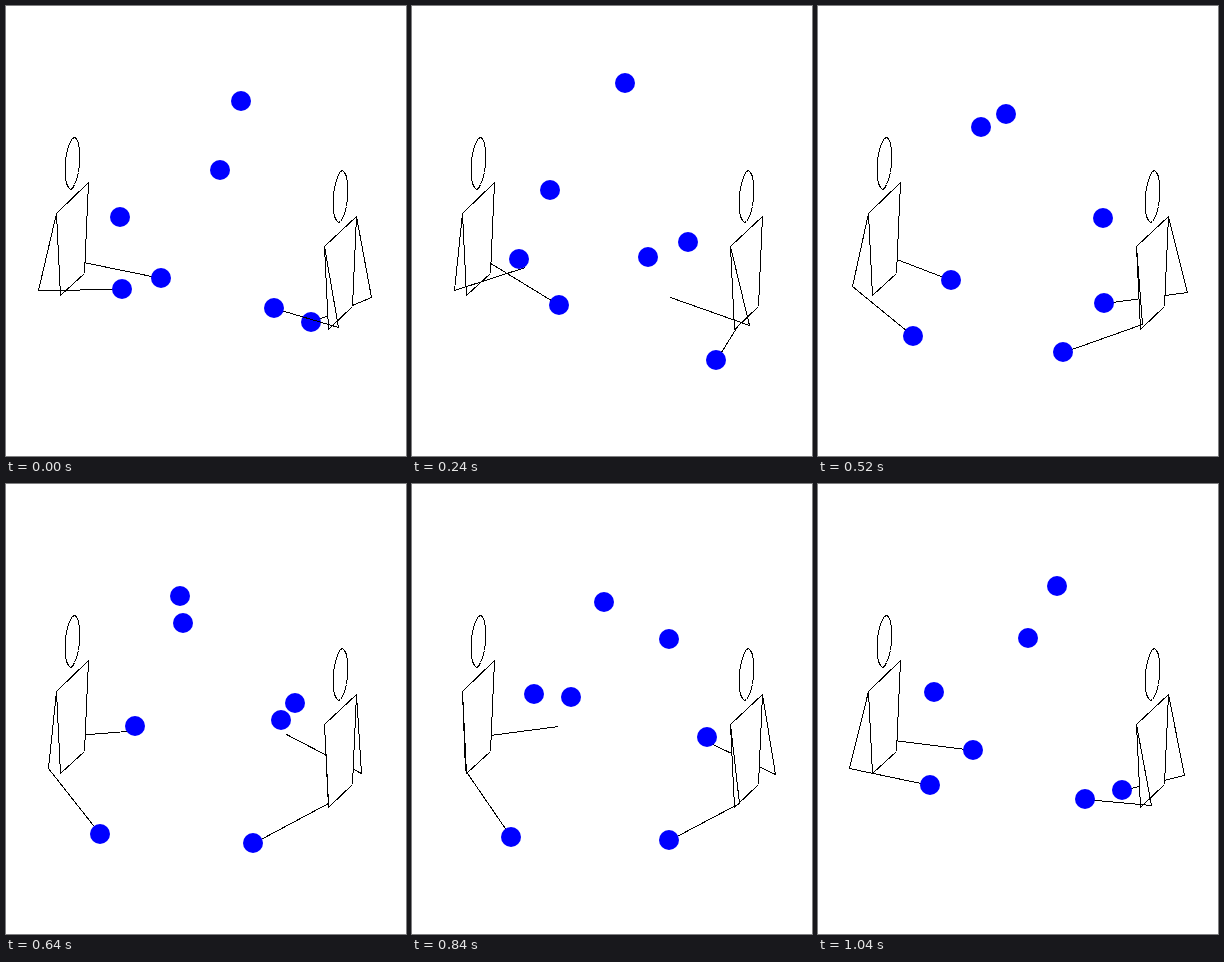
An HTML page for the animation above (1080 ms loop, 400 by 450 pixels).

```html
<!DOCTYPE html>
<html lang="en">
<head>
<meta charset="utf-8">
<title>Passing pattern</title>
<style>
  html, body { margin: 0; width: 100%; height: 100%; overflow: hidden; background: #fff; }
  svg { display: block; }
  circle { fill: #00f; stroke: none; }
  polyline, polygon { shape-rendering: crispEdges; transform: translate(.5px, .5px); }
</style>
</head>
<body>
<svg width="400" height="450" viewBox="0 0 400 450">
  <g id="scene" stroke="#000"></g>
</svg>
<script>
// Space is in cm: [x toward the back, y downward, z from left to right juggler].
// Time is in steps of 40 ms; each hand repeats every 27 steps.
const STEP = 40, PERIOD = 27, EMPTY = 9.45, DWELL = PERIOD - EMPTY;
const GAP = 138.8, G = 0.2971, ARM = 41;
const scene = document.getElementById('scene');

const mix = (f, ...vs) => vs[0].map((_, i) => f(...vs.map(v => v[i])));
const mod = t => (t % PERIOD + PERIOD) % PERIOD;

const project = ([x, y, z]) => [
  Math.round(66 + 0.703 * x + 1.931 * z),
  Math.round(191.4 - 0.66 * x + 0.241 * z + 1.931 * y)
];

function makeHand(side, who, start, catchX) {
  const z = who ? GAP - 30 : 30;
  return {
    start,
    shoulder: [23 * side, 0, GAP * who],
    from: [11.4 * side, 39.75, z],
    into: [catchX * side, 39.75, z]
  };
}

const leftNear = makeHand(-1, 0, 0, 30.8);
const rightNear = makeHand(-1, 1, 0, 39.3);
const leftFar = makeHand(1, 0, 13.5, 39.3);
const rightFar = makeHand(1, 1, 13.5, 30.8);
const near = [leftNear, rightNear], far = [leftFar, rightFar];
const hands = [...near, ...far];

function aim(hand, target, flight) {
  hand.flight = flight;
  hand.vThrow = mix((a, b) => (b - a) / flight, hand.from, target.into);
  hand.vThrow[1] -= G * flight;
  // Catch velocity that keeps the hand's acceleration continuous
  hand.vCatch = mix((p, c, v) => {
    const d = 6 * (p - c);
    return (d / DWELL ** 2 - 2 * v / DWELL - d / EMPTY ** 2 - 2 * v / EMPTY) /
      (4 / EMPTY + 4 / DWELL);
  }, hand.from, hand.into, hand.vThrow);
}
aim(leftNear, rightNear, 36.45);
aim(rightFar, leftFar, 36.45);
aim(rightNear, rightFar, 22.95);
aim(leftFar, leftNear, 22.95);

function hermite(p, v, q, w, h, t) {
  const s = t / h, r = 1 - s;
  return mix((a, b, c, d) =>
    r * r * (1 + 2 * s) * a + s * r * r * h * b + s * s * (3 - 2 * s) * c - s * s * r * h * d,
    p, v, q, w);
}

function handAt(hand, t) {
  const u = mod(t - hand.start);
  return u < EMPTY
    ? hermite(hand.from, hand.vThrow, hand.into, hand.vCatch, EMPTY, u)
    : hermite(hand.into, hand.vCatch, hand.from, hand.vThrow, DWELL, u - EMPTY);
}

function ballsAt(t) {
  const balls = [];
  for (const hand of hands) {
    const u = mod(t - hand.start);
    if (u >= EMPTY) balls.push(handAt(hand, t));
    for (let e = u; e < hand.flight; e += PERIOD) {
      const p = mix((a, v) => a + v * e, hand.from, hand.vThrow);
      p[1] += G * e * e;
      balls.push(p);
    }
  }
  return balls;
}

// Two equal links bending downward in the vertical plane of shoulder and hand
function elbow(shoulder, hand) {
  const d = mix((a, b) => b - a, shoulder, hand);
  const dist = Math.hypot(...d);
  if (dist >= 2 * ARM) return null;
  const drop = Math.sqrt(ARM * ARM - dist * dist / 4);
  const flat = Math.hypot(d[0], d[2]);
  const k = 0.5 - drop * d[1] / (dist * flat);
  return [
    shoulder[0] + d[0] * k,
    shoulder[1] + d[1] / 2 + drop * flat / dist,
    shoulder[2] + d[2] * k
  ];
}

const shape = (tag, points, fill) =>
  `<${tag} points="${points.map(project).join(' ')}" fill="${fill}"/>`;

function arm(hand, t) {
  const end = handAt(hand, t);
  const joints = [hand.shoulder, elbow(hand.shoulder, end), end].filter(Boolean);
  return shape('polyline', joints, 'none');
}

function ball(p) {
  const [x, y] = project(p);
  return `<circle cx="${x}" cy="${y}" r="10"/>`;
}

function body(z) {
  const head = Array.from({ length: 20 }, (_, i) => {
    const a = i * Math.PI / 10;
    return [10 * Math.cos(a), -18 + 13 * Math.sin(a), z];
  });
  const torso = [[-23, 0, z], [23, 0, z], [17, 44.8, z], [-17, 44.8, z]];
  return shape('polygon', head, '#fff') + shape('polygon', torso, '#fff');
}
const bodies = body(0) + body(GAP);

function draw(t) {
  const balls = ballsAt(t);
  scene.innerHTML = [
    ...far.map(h => arm(h, t)),
    bodies,
    ...balls.filter(p => p[0] > 0).map(ball),
    ...near.map(h => arm(h, t)),
    ...balls.filter(p => p[0] <= 0).map(ball)
  ].join('');
}

const origin = performance.now();
function tick() {
  const elapsed = Math.max(0, performance.now() - origin);
  draw(Math.floor(elapsed / STEP) % PERIOD);
  requestAnimationFrame(tick);
}
tick();
</script>
</body>
</html>
```
